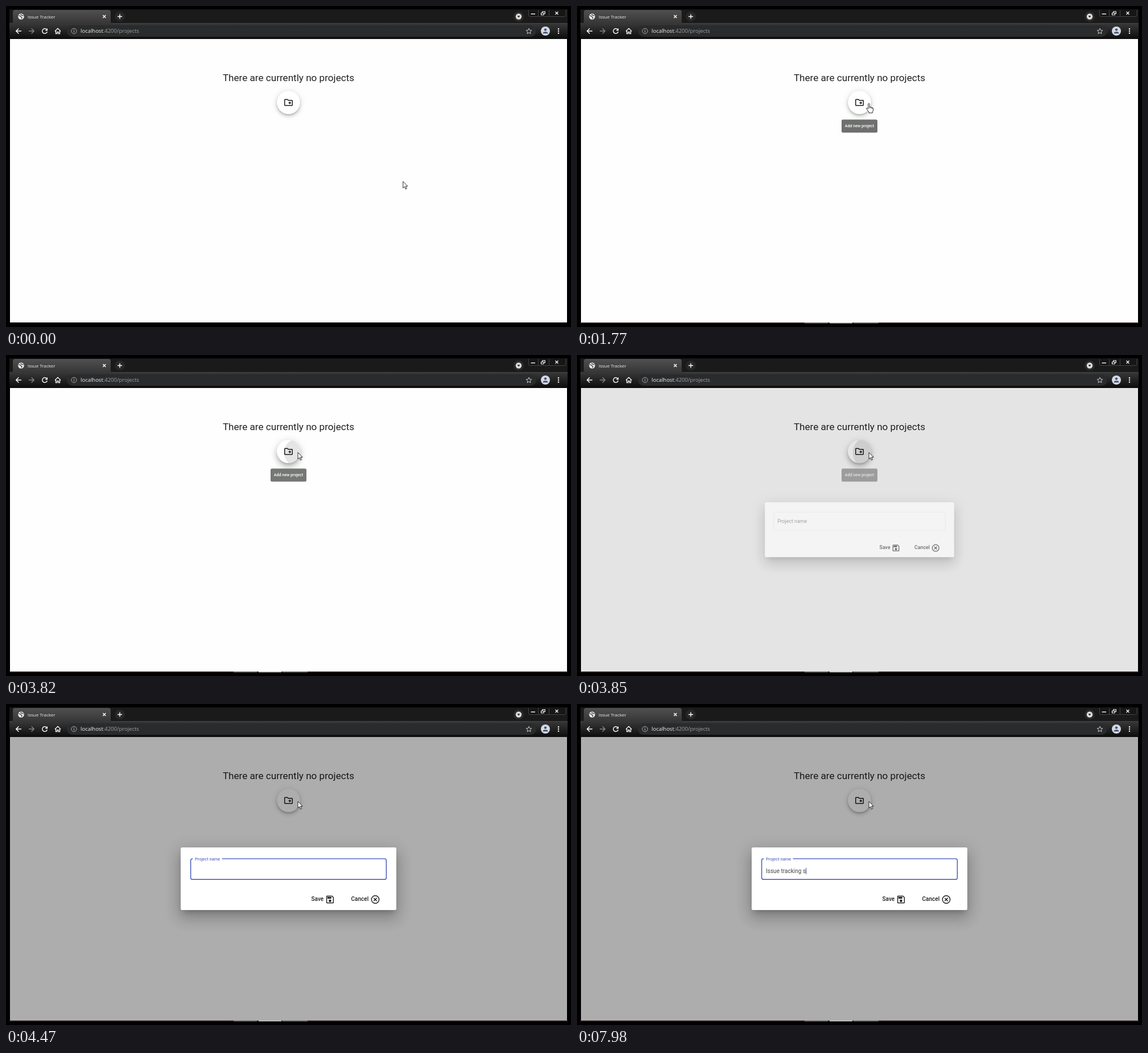
An HTML page for the animation above (8 s loop, 993x564 px).

```html
<!DOCTYPE html>
<html lang="en">
<head>
<meta charset="utf-8">
<title>Issue Tracker</title>
<style>
  html, body { margin: 0; width: 100%; height: 100%; overflow: hidden; background: #000; }
  #stage { position: absolute; left: 0; top: 0; width: 993px; height: 564px; overflow: hidden; }
  svg, #fab, #dialog { position: absolute; left: 0; top: 0; }
  text { font-family: Roboto, sans-serif; white-space: pre; }
  .ui { font-family: "Open Sans", "Noto Sans", sans-serif; }
  .line { fill: none; stroke: #fff; stroke-width: 1.4; }
  #fab { left: 476px; top: 149px; width: 41px; height: 41px; border-radius: 50%; background: #fff; }
  #dialog { left: 307px; top: 252px; width: 379px; height: 110px; border-radius: 2.5px; background: #fff;
    box-shadow: 0 7px 9.5px -4.4px #0003, 0 15px 24px 2px #00000024, 0 6px 29px 5px #0000001f; }
  #dialog text { font-size: 10.05px; }
  #tip { transform-origin: 496.5px 211px; }
</style>
</head>
<body>
<div id="stage">
  <svg width="993" height="564">
    <defs>
      <linearGradient id="tabFill" x2="0" y2="1"><stop stop-color="#505050"/><stop offset="1" stop-color="#363636"/></linearGradient>
      <linearGradient id="barFill" x2="0" y2="1"><stop stop-color="#393939"/><stop offset="1" stop-color="#0c0c0c"/></linearGradient>
      <clipPath id="fabClip"><circle cx="496.5" cy="169.5" r="20.5"/></clipPath>
    </defs>
    <!-- tab strip -->
    <rect x="6" y="6" width="981" height="25" fill="#1a1a1a"/>
    <rect x="6" y="30" width="981" height="28" fill="url(#barFill)"/>
    <path d="M6 30.5H987" stroke="#454545"/>
    <path d="M8 31q4 0 4-4V11q0-4 4-4H180q4 0 4 4V27q0 4 4 4z" fill="url(#tabFill)"/>
    <circle cx="26.5" cy="18.5" r="5.2" fill="#f1f1f1"/>
    <path d="M22.3 17q2.5 0 3 1.2t2.3 1.2q1 1.5-.8 3.2M26 14.2q0 2 2 2t2.2 1.5" fill="none" stroke="#444" stroke-width="1.4"/>
    <text class="ui" x="38" y="21.7" font-size="8" fill="#eee">Issue Tracker</text>
    <path class="line" d="M170.3 16l5 5m0-5l-5 5"/>
    <circle cx="200" cy="18.5" r="9" fill="#272727"/>
    <path class="line" d="M196 18.5h8m-4-4v8"/>
    <circle cx="901" cy="18.5" r="9" fill="#2b2b2b"/>
    <circle cx="901" cy="18.5" r="5.2" fill="#ddd"/>
    <path d="M898.5 17.2h5l-2.5 3.2z" fill="#222"/>
    <!-- window buttons -->
    <path d="M918.5 7V16q0 2.5 2.5 2.5H981.5q2.5 0 2.5-2.5V7M935.5 7V18.5M954.5 7V18.5" fill="#161616" stroke="#444"/>
    <path class="line" d="M922.5 14h7.5" stroke-width="1.8"/>
    <path class="line" d="M940.5 12.2h4.5v3.6h-4.5zM942.7 12V9.7h4.6v3.8h-2" style="stroke-width:1.1"/>
    <path class="line" d="M965.5 10l5 5m0-5l-5 5" style="stroke-width:1.2"/>
    <!-- toolbar -->
    <rect x="107" y="34" width="825" height="20" rx="10" fill="#2a2b2c"/>
    <path id="arrow" class="line" d="M27 44H17.8m4.5-4.6L17.7 44l4.6 4.6"/>
    <path class="line" d="M40 44h9.2m-4.5-4.6L49.3 44l-4.6 4.6" style="stroke:#858585"/>
    <path class="line" d="M71.4 41.2a4.3 4.3 0 1 0 .9 4"/>
    <path d="M73 39v4.4h-4.4z" fill="#fff"/>
    <path class="line" d="M85.8 44.4L91 39.3l5.2 5.1M87.5 43.5v5.2h2.3v-3h2.4v3h2.3v-5.2" style="stroke-width:1.3"/>
    <circle class="line" cx="119.5" cy="44" r="4.6" style="stroke:#aaa;stroke-width:1"/>
    <path d="M119.5 43.4v3.2M119.5 41.2v1.2" stroke="#bbb" stroke-width="1.1"/>
    <text class="ui" x="131" y="47.4" font-size="9.49" fill="#a0a3a6"><tspan fill="#f4f4f4">localhost</tspan>:4200/projects</text>
    <path class="line" d="M919 39.4l1.4 3.2 3.4.3-2.6 2.3.8 3.4-3-1.8-3 1.8.8-3.4-2.6-2.3 3.4-.3z" style="stroke-width:.9;stroke:#ddd"/>
    <circle cx="948" cy="44" r="8" fill="#d3d9e6"/>
    <circle cx="948" cy="41.6" r="2.2" fill="#45506a"/>
    <path d="M943.5 48.3q0-3 4.5-3t4.5 3z" fill="#45506a"/>
    <g fill="#fff"><circle cx="971" cy="40.3" r="1.2"/><circle cx="971" cy="44" r="1.2"/><circle cx="971" cy="47.7" r="1.2"/></g>
    <!-- page -->
    <rect x="7" y="58" width="979" height="498" fill="#fefefe"/>
    <g id="sliver">
      <path d="M6 556.7H987" stroke="#463432" stroke-width="1.4"/>
      <path d="M400 556.8h41m45 0h44" stroke="#8a8580" stroke-width="1.3"/>
      <path d="M444 556.8h40" stroke="#d0cec9" stroke-width="1.5"/>
    </g>
  </svg>

  <div id="fab"></div>

  <svg width="993" height="564">
    <circle id="ripple" cx="513" cy="171.5" clip-path="url(#fabClip)"/>
    <path transform="translate(487.5 160.4) scale(.75)" fill="#1c1c1c" d="M20 6h-8l-2-2H4c-1.1 0-2 .9-2 2v12c0 1.1.9 2 2 2h16c1.1 0 2-.9 2-2V8c0-1.1-.9-2-2-2zm0 12H4V6h5.2l2 2H20zm-8-4h2v2h2v-2h2v-2h-2v-2h-2v2h-2z"/>
    <text x="496.5" y="132" font-size="17.1" fill="#212121" text-anchor="middle">There are currently no projects</text>
    <g id="tip">
      <rect x="465" y="199.5" width="63" height="23" rx="2.5" fill="#6e706e"/>
      <text x="496.5" y="213.3" font-size="7.1" font-weight="500" fill="#fff" text-anchor="middle">Add new project</text>
    </g>
    <rect id="backdrop" x="7" y="58" width="979" height="498"/>
  </svg>

  <div id="dialog">
    <svg width="379" height="110" viewBox="307 252 379 110">
      <rect id="idleBox" x="324.6" y="271.9" width="343.8" height="36.3" rx="3" fill="none" stroke="#000" stroke-width=".7"/>
      <path id="focusBox" d="M379.5 271.9H665.4q3 0 3 3V305.2q0 3-3 3H327.6q-3 0-3-3V274.9q0-3 3-3h.8" fill="none" stroke="#3f51b5" stroke-width="1.4"/>
      <text id="label">Project name</text>
      <text id="typed" x="332" y="296.6" fill="#444"></text>
      <rect id="caret" y="288" width="1" height="11" fill="#3f51b5"/>
      <g fill="#212121" font-weight="500">
        <text x="536.5" y="346.1">Save</text>
        <text x="606.5" y="346.1">Cancel</text>
        <path transform="translate(560.6 334.6) scale(.74)" d="M17 3H5c-1.1 0-2 .9-2 2v14c0 1.1.9 2 2 2h14c1.1 0 2-.9 2-2V7zm2 16H5V5h11.2L19 7.8zm-7-7a3 3 0 1 0 0 6a3 3 0 1 0 0-6zM6 6h9v4H6z"/>
      </g>
      <path d="M646.2 340.7l5.6 5.6m0-5.6l-5.6 5.6M642.3 343.5a6.7 6.7 0 1 0 13.4 0a6.7 6.7 0 1 0-13.4 0" fill="none" stroke="#212121" stroke-width="1.45"/>
    </svg>
  </div>

  <svg width="993" height="564">
    <g id="cursor" fill="#fff" stroke="#111" stroke-width=".9" stroke-linejoin="round">
      <path id="pointer" d="M0 0V11.6L2.7 9.1 4.5 13.5 6.4 12.7 4.6 8.4H8.2z"/>
      <g id="hand">
        <path d="M-1.2 9.5V1.3a1.2 1.2 0 0 1 2.4 0V6.3q2.4-.6 2.4.6q2-.4 2.2.7q1.7-.2 1.7 1.2v3q0 1.6-1.2 3.2v1.7h-6.3v-1.5l-3.9-5.3q-1-1.5.2-1.9q1-.2 2.5 1.4z"/>
        <path d="M1.2 6.3v2.6M3.6 6.9v2.2M5.8 7.6v1.8" stroke-width=".7"/>
      </g>
    </g>
  </svg>
</div>

<script>
const $ = id => document.getElementById(id);
const set = (id, attrs) => { for (const k in attrs) $(id).setAttribute(k, attrs[k]); };
const show = (id, on) => $(id).style.display = on ? '' : 'none';
const lerp = (a, b, p) => a + (b - a) * p;
const span = (t, start, length) => Math.min(1, Math.max(0, (t - start) / length));

function bezier(x1, y1, x2, y2) {
  const at = (a, b, s) => 3 * (1 - s) * (1 - s) * s * a + 3 * (1 - s) * s * s * b + s * s * s;
  return x => {
    let lo = 0, hi = 1;
    for (let i = 0; i < 24; i++) {
      const mid = (lo + hi) / 2;
      if (at(x1, x2, mid) < x) lo = mid; else hi = mid;
    }
    return at(y1, y2, (lo + hi) / 2);
  };
}
const decel = bezier(0, 0, .2, 1);
const swift = bezier(.25, .8, .25, 1);
const glide = bezier(.4, 0, .3, 1);

const phrase = 'Issue tracking sy';
const keys = [5350, 5650, 5750, 5850, 5960, 6060, 6320, 6520, 6590,
  6790, 6890, 6990, 7080, 7180, 7280, 7450, 7650];
const OPEN = 3812, FOCUS = 3962;

function drawCursor(t) {
  const p = glide(span(t, 735, 805));
  const x = lerp(697.8, 513, p), y = lerp(308.3, 171.2, p);
  const hand = Math.hypot(x - 496.5, y - 169.5) < 20.5 && t < 3800;
  set('cursor', { transform: `translate(${x} ${y})` });
  show('hand', hand);
  show('pointer', !hand);
}

function drawButton(t) {
  const lift = decel(span(t, 3670, 280)) * (1 - decel(span(t, 3810, 280)));
  const mix = (a, b) => lerp(a, b, lift) * .63 + 'px';
  $('fab').style.boxShadow = [
    `0 ${mix(3, 7)} ${mix(5, 8)} ${mix(-1, -4)} #0003`,
    `0 ${mix(6, 12)} ${mix(10, 17)} ${mix(0, 2)} #00000024`,
    `0 ${mix(1, 5)} ${mix(18, 22)} ${mix(0, 4)} #0000001f`].join();
  set('ripple', {
    r: 43.6 * decel(span(t, 3714, 450)),
    opacity: .1 * (1 - decel(span(t, 4164, 400)))
  });
}

function drawTip(t) {
  const p = decel(span(t, 1572, 200));
  const scale = p < .5 ? p * 1.98 : lerp(.98, 1, p);
  $('tip').style.transform = `scale(${scale})`;
  $('tip').style.opacity = p * (1 - span(t, 3817, 77));
}

function drawDialog(t) {
  const open = t >= 3835;
  show('dialog', open);
  set('backdrop', { opacity: open ? .32 * swift(span(t, OPEN, 400)) : 0 });
  if (!open) return;

  const p = decel(span(t, OPEN, 150));
  $('dialog').style.opacity = p;
  $('dialog').style.transform = `scale(${lerp(.7, 1, p)})`;

  const f = swift(span(t, FOCUS, 400));
  set('idleBox', { opacity: .12 * (1 - f) });
  set('focusBox', { opacity: f });
  set('label', {
    transform: `translate(332 ${lerp(293.4, 275.4, f)}) scale(${lerp(1, .75, f)})`,
    fill: `rgb(${lerp(118, 63, f)},${lerp(118, 81, f)},${lerp(118, 181, f)})`
  });

  const count = t >= 7980 ? 16 : keys.filter(k => t >= k).length;
  $('typed').textContent = phrase.slice(0, count);
  set('caret', { x: 332 + (count && $('typed').getComputedTextLength()) });
  show('caret', t >= FOCUS && (t < 4470 || t >= 4990));
}

function frame() {
  const t = performance.now() % 8000;
  show('sliver', t >= 20);
  drawCursor(t);
  drawButton(t);
  drawTip(t);
  drawDialog(t);
  requestAnimationFrame(frame);
}
frame();
</script>
</body>
</html>
```
